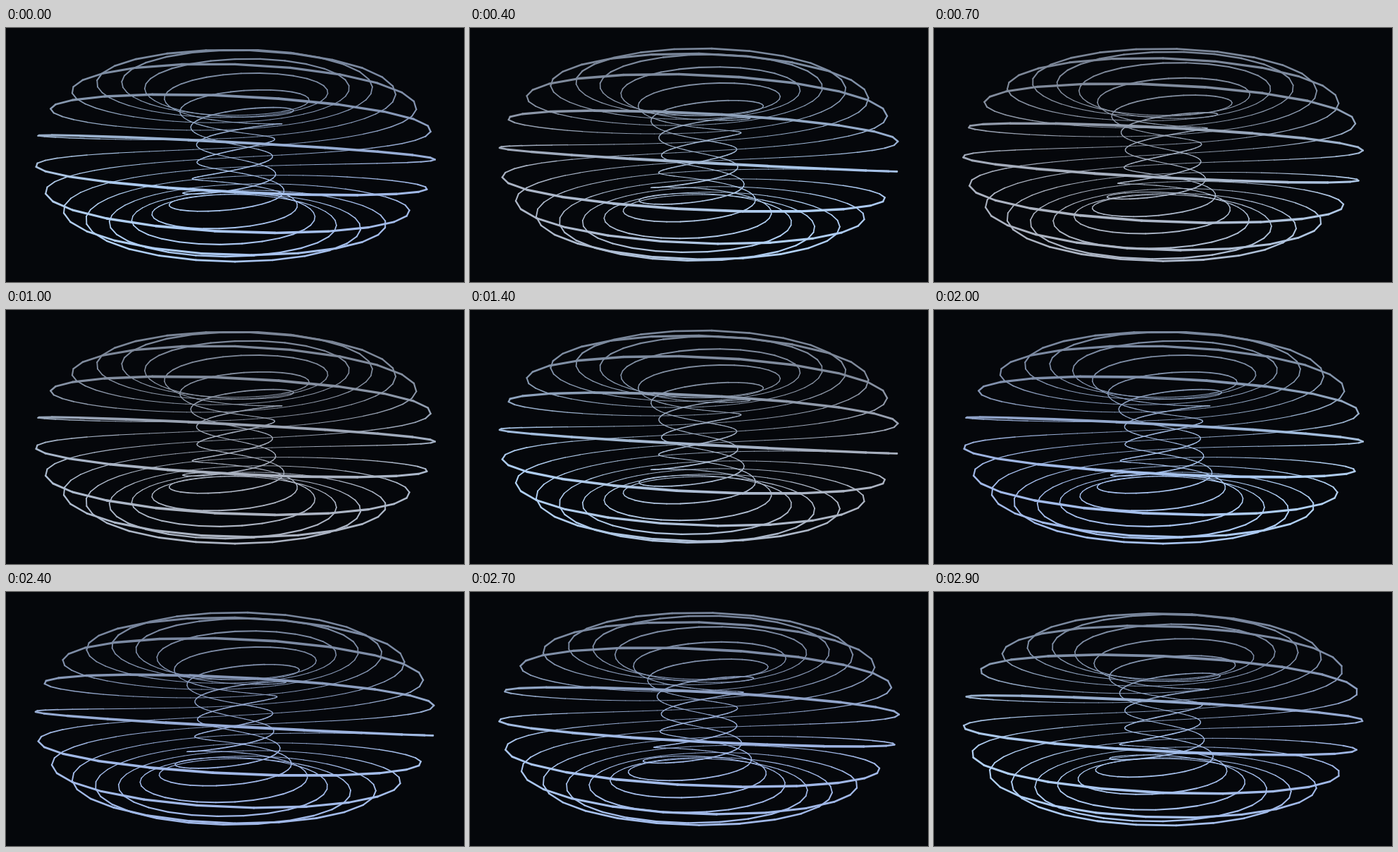
An HTML page with a canvas for the animation above (3000 ms loop, 650 by 360 pixels).

```html
<!DOCTYPE html>
<html lang="en">
<head>
<meta charset="utf-8">
<title>Torus coil</title>
<style>
  html, body { margin: 0; width: 100%; height: 100%; overflow: hidden; background: #05070b; }
  canvas { display: block; }
</style>
</head>
<body>
<canvas id="stage" width="650" height="360"></canvas>
<script>
const W = 650, H = 360, CX = 325, CY = 180;
const LOOP = 3000, STEP = 100;
const TAU = Math.PI * 2;

// Torus measures, in units of the camera distance; 60 degree field of view
const FOCAL = H / 2 / Math.tan(Math.PI / 6), RING = 0.421, TUBE = 0.2525;
const STRANDS = 3, TURNS = 7, SEGMENTS = 40;
const LINE = 1.3;

const GREY = [172, 179, 193], SKY = [177, 209, 246], PERI = [160, 183, 231];

const ctx = document.getElementById('stage').getContext('2d');

function project(s, turn) {
  const v = s / TURNS, u = s + turn;
  const rho = RING + TUBE * Math.cos(v);
  const scale = 1 / (1 - rho * Math.sin(u));
  return {
    x: CX - FOCAL * rho * Math.cos(u) * scale,
    y: CY + FOCAL * TUBE * Math.sin(v) * scale,
    scale
  };
}

function drawStrand(turn) {
  const count = TURNS * SEGMENTS;
  let a = project(0, turn);
  for (let i = 1; i <= count; i++) {
    const b = project(i / SEGMENTS * TAU, turn);
    ctx.lineWidth = LINE * (a.scale + b.scale) / 2;
    ctx.beginPath();
    ctx.moveTo(a.x, a.y);
    ctx.lineTo(b.x, b.y);
    ctx.stroke();
    a = b;
  }
}

function mix(a, b, k) {
  return a.map((n, i) => Math.round(n + (b[i] - n) * k));
}

// Grey, sky, periwinkle and back; the right side lags behind the left
function tint(x, t) {
  const phase = (t - 600 - 750 * (x - 42) / 566) / LOOP;
  const k = 1 - Math.cos(TAU * phase);
  const c = k < 1 ? mix(GREY, SKY, k) : mix(SKY, PERI, k - 1);
  return `rgb(${c})`;
}

function fill(mode, style) {
  ctx.globalCompositeOperation = mode;
  ctx.fillStyle = style;
  ctx.fillRect(0, 0, W, H);
}

function sweep(t) {
  const g = ctx.createLinearGradient(0, 0, W, 0);
  for (let i = 0; i <= 10; i++) g.addColorStop(i / 10, tint(i / 10 * W, t));
  return g;
}

// The upper part fades to a dull slate
function shade() {
  const g = ctx.createLinearGradient(0, 0, 0, H);
  [[30, 0.85], [95, 0.7], [150, 0.35], [200, 0.1], [240, 0]].forEach(([y, a]) =>
    g.addColorStop(y / H, `rgba(112,123,141,${a})`));
  return g;
}

const slate = shade();

function draw(t) {
  ctx.globalCompositeOperation = 'source-over';
  ctx.clearRect(0, 0, W, H);
  ctx.strokeStyle = '#fff';
  ctx.lineCap = 'round';
  for (let k = 0; k < STRANDS; k++) drawStrand(TAU * (k / STRANDS - t / LOOP));
  fill('source-in', sweep(t));
  fill('source-atop', slate);
  fill('destination-over', '#05070b');
}

const start = performance.now();
let last = -1;

function tick() {
  const t = Math.floor((performance.now() - start) / STEP) * STEP % LOOP;
  if (t !== last) draw(last = t);
  requestAnimationFrame(tick);
}
tick();
</script>
</body>
</html>
```
